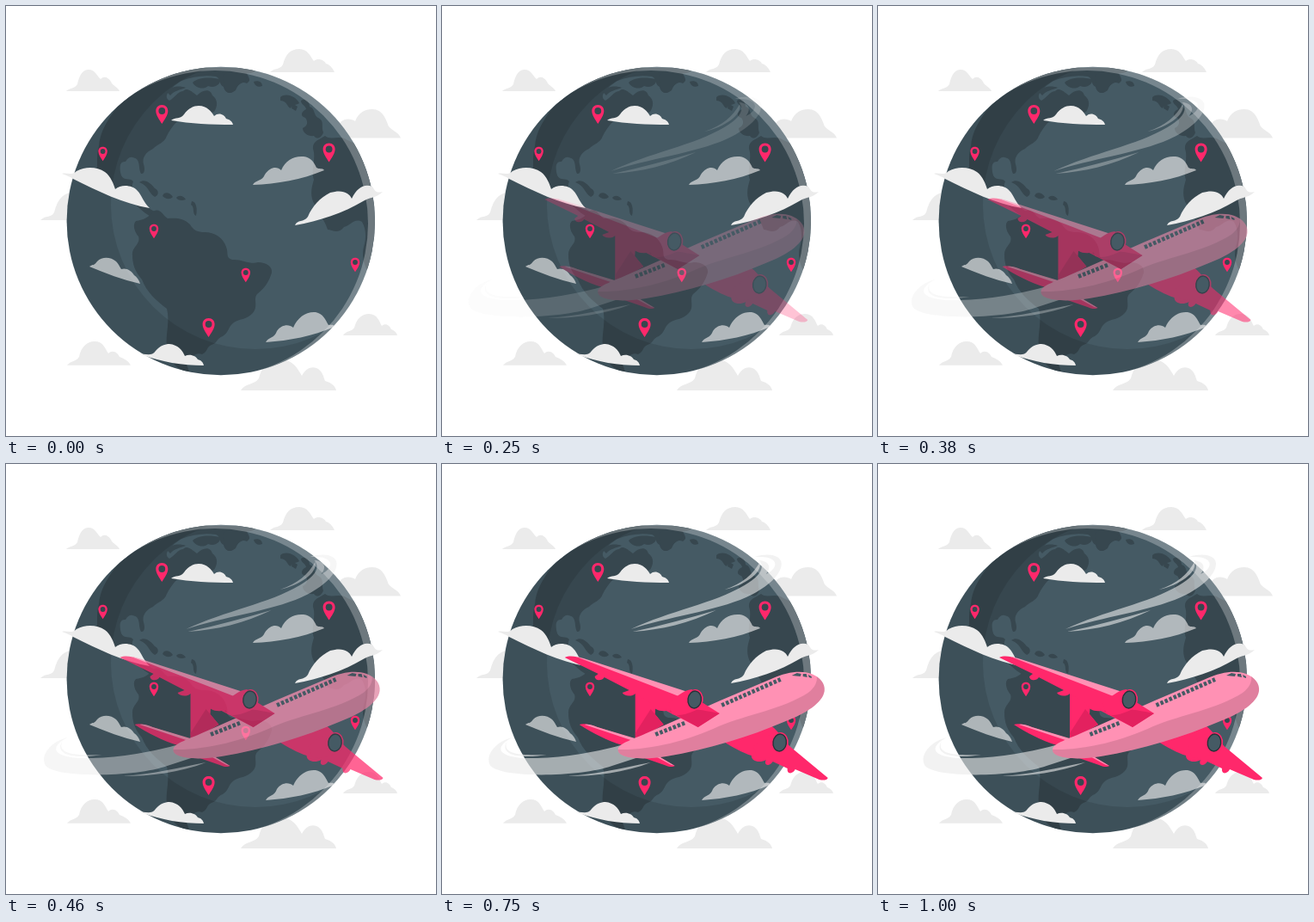
An HTML page that plays this animation: 500 by 500 pixels, repeating every 1040 ms.

```html
<!DOCTYPE html>
<html lang="en">
<head>
<meta charset="utf-8">
<title>Plane over the globe</title>
<style>
  html, body { margin: 0; width: 100%; height: 100%; overflow: hidden; background: #fff; }
  svg { display: block; width: 100vw; height: 100vh; }
  .pink { fill: #ff286b; }
  .deep { fill: #e3215f; }
  .pale { fill: #ff91b4; }
  .cloud { fill: #ebebeb; }
  .mist { fill: #ebebeb; opacity: .65; }
  .windows { fill: none; stroke: #455a64; stroke-width: 4.8; stroke-dasharray: 3.5 2; }
</style>
</head>
<body>
<svg viewBox="0 0 500 500">
  <defs>
    <clipPath id="disc"><circle cx="249.800" cy="250" r="179.200"/></clipPath>
    <mask id="shade"><rect width="500" height="500" fill="#fff"/><circle cx="290" cy="231" r="168"/></mask>
    <mask id="rim"><rect width="500" height="500" fill="#fff"/><circle cx="243" cy="253" r="178"/></mask>
    <g id="pin">
      <path class="pink" d="M0-11C-4.300-11-7-8-7-4C-7 1-3 6 0 11C3 6 7 1 7-4C7-8 4.300-11 0-11Z"/>
      <circle cy="-4" r="3.900" fill="#37474f"/>
    </g>
    <g id="engine">
      <path class="pink" d="M-3-12C-14-11-22-2-31 4L-26 17C-14 20-6 15 2 12Z"/>
      <ellipse class="pink" rx="10" ry="12" transform="rotate(8)"/>
      <ellipse rx="7.700" ry="10" fill="#455a64" stroke="#263238" stroke-width="1.400" transform="rotate(8)"/>
    </g>
  </defs>

  <g class="cloud">
    <path d="M70 99C74 95 79 97 83 91C85 81 89 74 96 74C104 74 106 82 110 85C114 81 119 83 122 88C124 93 130 94 132 99Z"/>
    <path d="M307 77C312 72 319 74 322 68C325 56 331 50 341 50C351 50 354 59 358 64C363 60 370 63 372 67C376 68 380 72 382 77Z"/>
    <path d="M360 153.500C370 143 382 145 389 135C394 130 402 131 406 134C410 124 417 120 426 120C438 120 442 132 445 140C450 146 456 146 459 153.500Z"/>
    <path d="M40 249C46 243 52 247 56 240C60 224 67 216 82 216V249Z"/>
    <path d="M71 417.700C76 412 81 414 85 408C87 397 94 390 103 390C113 390 115 398 119 404C124 399 130 403 132 408C137 410 142 412 145 417.700Z"/>
    <path d="M273 447C278 438 289 441 294 433C297 418 308 409 321 412C333 411 339 421 344 430C349 421 355 419 361 421C368 424 369 431 371 436C377 438 382 440 384 447Z"/>
    <path d="M392 383C396 377 402 379 405 374C408 363 414 358 422 358C432 358 434 367 437 372C441 368 446 371 448 376C451 377 454 379 455 383Z"/>
  </g>

  <g clip-path="url(#disc)">
    <rect width="500" height="500" fill="#455a64"/>
    <g fill="#37474f">
      <path d="M104 198C108 186 104 176 108 163C109 148 116 136 125 123C145 97 176 78 215 72L288 72C294 76 284 79 280 78C282 84 286 86 280 90C274 87 270 91 267 98C260 104 254 100 253 94C247 91 250 84 244 82C231 80 217 82 204 87C193 94 181 105 190 110C197 106 199 100 206 99C211 94 216 100 222 104C228 98 237 95 240 104C247 109 246 117 242 123C233 127 221 125 212 130C207 133 201 129 199 134C194 139 190 145 187 151C184 160 176 160 171 166C162 170 158 177 160 184C162 190 161 196 157 195C154 190 156 182 152 178C147 175 143 174 139 181C131 180 132 190 134 197C137 204 144 199 148 204C144 213 150 218 157 224C162 228 165 237 174 239L170 246C158 239 149 230 140 219C129 211 119 212 113 202Z"/>
      <path d="M187 100C193 92 203 93 209 95C202 98 196 98 191 104ZM217 89C224 82 239 83 249 85C250 91 243 96 235 93C229 98 220 95 217 89ZM252 80C262 76 273 78 280 83C279 90 270 88 267 97C261 104 255 101 254 94ZM288 88C293 86 298 88 298 93C294 95 289 93 288 88Z"/>
      <path d="M155 205C162 200 169 207 173 212C178 214 178 220 173 222C166 218 166 209 155 205ZM182 221C184 215 191 217 194 222C190 226 185 224 182 221ZM198 223C201 219 207 221 209 225C204 227 200 226 198 223ZM216 227C221 227 223 236 221 244C216 242 220 234 215 231Z"/>
      <path d="M319 106C326 100 338 106 341 113C338 116 333 113 331 119C326 117 328 111 319 110ZM333 113L339 117L337 122L332 119ZM343 110C349 106 353 112 353 117C360 119 357 127 363 130C371 134 366 140 369 147C367 153 362 156 358 151C352 152 345 148 345 142C350 140 352 135 348 130C341 128 344 122 349 120C348 115 343 115 343 110Z"/>
      <path d="M357 166C356 157 365 155 371 151C378 157 388 149 397 156L408 161L431 205V310L421 309C417 302 413 291 416 280C419 270 419 260 414 251C405 246 401 255 393 257C386 266 379 260 374 260C370 246 361 242 359 231C353 222 355 211 358 202C354 191 361 178 357 166Z"/>
      <path d="M151 250C159 249 166 246 171 239C180 234 182 244 188 247C198 246 207 247 214 254C218 261 223 263 231 263C243 263 253 270 256 280C259 287 255 293 263 295C274 294 284 301 293 298C303 298 310 303 309 310C306 320 301 328 292 335C287 341 294 349 287 357C280 365 270 364 265 368C258 373 259 380 252 384C245 386 246 392 239 394C233 396 235 402 228 405C220 402 216 409 209 414L213 425C199 425 189 412 187 396C185 382 191 368 187 352C175 343 163 332 158 318C150 309 147 300 147 290C146 280 157 277 154 268C149 262 147 254 151 250Z"/>
    </g>
    <rect width="500" height="500" opacity=".1" mask="url(#shade)"/>
    <rect width="500" height="500" fill="#fff" opacity=".27" mask="url(#rim)"/>
  </g>

  <g class="cloud">
    <path d="M192 133C197 129 203 132 207 126C212 119 218 116 224 116C234 116 239 123 242 128C247 123 254 126 256 131C260 132 263 134 264 138C238 138 215 137 192 133Z"/>
    <path d="M65 195C70 193 76 198 82 192C93 186 106 187 115 193C122 198 125 207 127 213C134 207 147 208 153 215C158 220 160 229 167 235C137 230 106 215 78 201C74 198 70 197 65 195Z"/>
    <path d="M336 255C339 248 346 252 351 245C356 233 365 223 377 217C391 213 399 217 402 224C408 211 417 206 426 210C429 214 429 218 438 216C431 223 424 222 417 226C392 241 364 250 336 255Z"/>
    <path d="M157 405C163 404 169 408 174 401C179 395 185 393 190 393C200 394 205 400 208 407C214 404 221 407 223 411C227 412 229 414 230 418C206 418 180 414 157 405Z"/>
  </g>
  <g class="mist">
    <path d="M287 208C290 202 298 204 301 196C307 187 315 186 320 191C325 179 335 174 346 175C354 176 358 181 361 188C364 190 368 188 370 191C344 202 315 207 287 208Z"/>
    <path d="M97 303C100 300 102 303 106 297C112 291 122 292 128 297C131 300 132 303 134 306C140 304 146 308 149 313C152 315 155 319 156 323C135 318 116 311 97 303Z"/>
    <path d="M302 391C306 384 312 387 315 378C321 370 329 370 334 374C339 362 349 355 360 356C369 358 371 364 375 371C378 371 381 370 382 373C356 384 330 389 302 391Z"/>
  </g>

  <use href="#pin" x="181.300" y="126"/>
  <use href="#pin" x="375.600" y="170.500"/>
  <use href="#pin" x="235.600" y="374"/>
  <use href="#pin" transform="translate(112.600 172) scale(.75)"/>
  <use href="#pin" transform="translate(172 262) scale(.75)"/>
  <use href="#pin" transform="translate(278.800 313) scale(.75)"/>
  <use href="#pin" transform="translate(406 301) scale(.75)"/>

  <g id="plane" opacity="0">
    <g class="cloud" opacity=".6">
      <path d="M218 192C262 171 315 162 350 141C367 131 375 121 367 112C380 113 381 121 375 128C387 123 389 113 380 110C375 108 371 108 362 108C378 103 392 106 393 115C394 130 372 146 352 155C316 171 260 178 218 192Z"/>
      <path d="M220 195C253 188 286 179 317 170C286 185 253 193 220 195ZM327 146C348 139 360 128 368 114C371 127 350 141 327 146Z"/>
      <path d="M206 327C171 337 126 343 98 342C66 341 56 331 80 318C62 322 48 338 54 350C64 366 160 364 196 351L236 338Z"/>
      <path d="M144 363C177 361 210 353 241 347C210 359 177 363 144 363ZM74 322C67 338 91 339 120 338C99 342 62 342 74 322Z"/>
    </g>

    <path class="pink" d="M223 262L247 277L246 291L256 303L223 322Z"/>
    <path class="deep" d="M223 313L241 285L246 291L256 303L224 320Z"/>
    <path class="pink" d="M158 303C163 301 171 303 176 305L226 321L208 327C189 321 174 313 158 303Z"/>
    <path class="pale" d="M164 303C169 302 174 304 179 306L226 320L221 322Z"/>
    <path class="pink" d="M228 340L247 338L269 351C266 353 261 352 257 350Z"/>
    <path class="pale" d="M243 338L247 338L269 351L265 350Z"/>

    <path class="pink" d="M324 322L381 304C391 312 398 325 406 331L447 365C446 368 441 368 437 367L409 355C406 361 399 361 400 354L383 346C379 352 372 351 375 344C368 348 358 346 358 339C348 336 336 329 324 322Z"/>
    <use href="#engine" x="391" y="324"/>

    <path class="pale" d="M203 332C203 325 221 320 243 310L322 275L381 250C401 241 416 240 428 244C438 248 444 255 443 264C441 278 421 290 398 299C356 317 307 332 259 340C229 345 202 342 203 332Z"/>
    <path d="M203 332C239 333 284 322 320 305C354 291 394 285 424 266C432 260 435 253 434 247C441 252 444 258 443 264C441 278 421 290 398 299C356 317 307 332 259 340C229 345 202 342 203 332Z" opacity=".12"/>
    <path class="windows" d="M246.500 314.500L282 300.500M323.500 280.500L392 250.500"/>
    <path d="M405 246L411 243L416 244L415 247ZM418 244L422 244L423 248L418 247ZM424 245L428 247L428 249L425 248Z" fill="#455a64"/>

    <path class="pink" d="M141 225C147 222 155 224 161 226L283 266L321 290L296 306L259 287C251 288 244 285 242 279L223 267C219 271 210 270 208 266L216 263L187 248C184 253 176 252 176 247L180 244Z"/>
    <path class="pale" d="M154 224C158 224 162 226 166 227L284 265L276 271L240 257Z"/>
    <path class="deep" d="M262 287L278 285C291 284 305 287 321 290L296 306Z"/>
    <use href="#engine" x="292" y="274"/>
  </g>
</svg>
<script>
  const plane = document.getElementById('plane');
  const LOOP = 1040, LEAD = 25, SLIDE = 30;

  const bezier = (s, a, b) => 3 * (1 - s) ** 2 * s * a + 3 * (1 - s) * s * s * b + s ** 3;

  // Ease with a slight overshoot; solves x(s) = t by bisection.
  function ease(t) {
    if (t >= 1) return 1;
    let lo = 0, hi = 1;
    for (let i = 0; i < 24; i++) {
      const mid = (lo + hi) / 2;
      if (bezier(mid, .36, .5) < t) lo = mid; else hi = mid;
    }
    return bezier(lo, -.01, 1.38);
  }

  function draw(now) {
    const time = now % LOOP;
    const p = time < 80 ? 0 : ease((time + LEAD) / 1000);
    plane.setAttribute('opacity', Math.min(1, Math.max(0, p)));
    plane.setAttribute('transform', `translate(${SLIDE * (p - 1)} 0)`);
  }

  const start = performance.now();
  function tick() {
    draw(performance.now() - start);
    requestAnimationFrame(tick);
  }
  tick();
</script>
</body>
</html>
```
